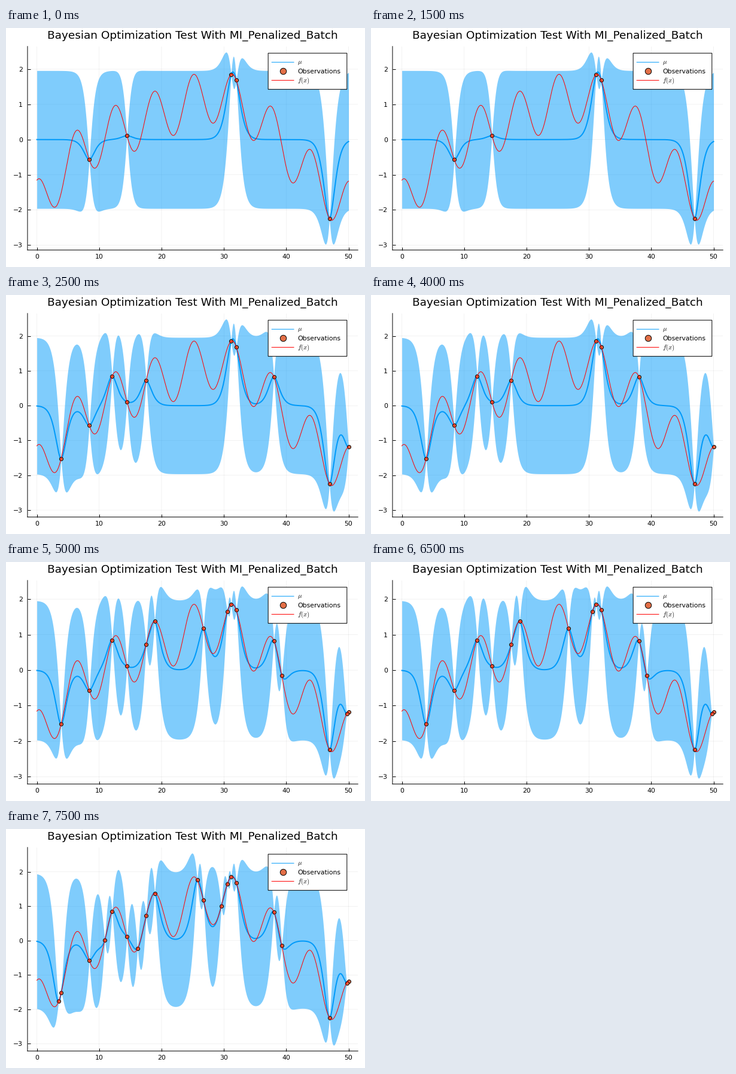
Recreate the animation shown at these times as a matplotlib script. Size 600 by 400 pixels, loop 10 s.

```python
import numpy as np
import matplotlib.pyplot as plt
from matplotlib.animation import FuncAnimation
from matplotlib.patches import Rectangle

W, H, DPI = 600, 400, 100
LEFT, RIGHT, TOP, BOTTOM = 35.97, 588.19, 30.79, 371.61
BLUE, ORANGE, RED = "#009AFA", "#E36F47", "#FF0000"
PX = 72 / DPI  # points per pixel
TITLE_SIZE, LABEL_SIZE = 18.45, 10.9

plt.rcParams.update({
    "font.family": "DejaVu Sans",
    "mathtext.fontset": "cm",
    "path.snap": False,  # keep lines and markers at subpixel positions
})

# Sample positions added by each batch
BATCHES = [
    [8.4, 14.45, 31.16, 31.98, 46.93],
    [3.89, 12.07, 17.53, 38.01, 50.0],
    [18.9, 26.72, 30.55, 39.28, 49.72],
    [3.5, 10.9, 16.15, 25.72, 29.58],
]
GRID = np.linspace(0, 50, 1001)


def objective(x):
    return (3 * np.sin(np.pi * x / 50) + 0.25 * np.sin(2 * np.pi * x / 25)
            + 0.75 * np.cos(x) - 1.905)


def matern52(a, b):
    r = np.sqrt(5) * np.abs(a[:, None] - b[None, :])
    return (1 + r + r**2 / 3) * np.exp(-r)


def posterior(x_obs):
    gram = matern52(x_obs, x_obs) + 1e-6 * np.eye(len(x_obs))
    cross = matern52(GRID, x_obs)
    weights = np.linalg.solve(gram, cross.T)
    mean = weights.T @ objective(x_obs)
    var = 1 - np.sum(cross.T * weights, axis=0)
    return mean, np.sqrt(np.clip(var, 0, None))


fig = plt.figure(figsize=(W / DPI, H / DPI), dpi=DPI, facecolor="white")
ax = fig.add_axes([LEFT / W, 1 - BOTTOM / H, (RIGHT - LEFT) / W, (BOTTOM - TOP) / H])
overlay = fig.add_axes([0, 0, 1, 1], zorder=5)
overlay.set(xlim=(0, W), ylim=(H, 0))
overlay.axis("off")


def label(x, y, text, size=LABEL_SIZE, **kw):
    overlay.text(x, y, text, fontsize=size * PX, **kw)


def draw_overlay():
    label((LEFT + RIGHT) / 2, 18.1, "Bayesian Optimization Test With MI_Penalized_Batch",
          TITLE_SIZE, ha="center")
    box_left, box_top, row = 438.15, 42.15, 15.12
    overlay.add_patch(Rectangle((box_left, box_top), 131.65, 4 * row,
                                fc="white", ec="black", lw=PX))
    for k, color in ((1, BLUE), (3, RED)):
        y = box_top + k * row
        overlay.plot([444.2, 481], [y, y], color=color, lw=PX)
    overlay.plot(462.6, box_top + 2 * row, "o", ms=10.4 * PX,
                 mfc=ORANGE, mec="black", mew=PX)
    label(487, 59.5, r"$\mu$")
    label(487, 76.5, "Observations")
    label(487, 91, "$f(x)$")
    for tick in range(0, 51, 10):
        x = LEFT + (tick + 1.5) * (RIGHT - LEFT) / 53
        label(x, 386.5, str(tick), ha="center")


def draw(i):
    x_obs = np.array(sum(BATCHES[:i + 1], []))
    mean, sd = posterior(x_obs)
    low, high = mean - 1.96 * sd, mean + 1.96 * sd
    pad = 0.03 * (high.max() - low.min())
    y0, y1 = low.min() - pad, high.max() + pad
    unit = (y1 - y0) / (BOTTOM - TOP)

    ax.clear()
    ax.set(xlim=(-1.5, 51.5), ylim=(y0, y1), xticks=range(0, 51, 10), yticks=range(-3, 3))
    ax.set_axisbelow(True)
    ax.grid(color="black", alpha=0.1, lw=0.5 * PX)
    ax.tick_params(direction="in", length=5 * PX, width=PX, labelbottom=False, labelleft=False)
    ax.spines[["top", "right"]].set_visible(False)
    ax.spines[["left", "bottom"]].set_linewidth(PX)
    for tick in range(-3, 3):
        ax.text(-2.27, tick - 4 * unit, str(tick).replace("-", "\u2212"),
                fontsize=LABEL_SIZE * PX, ha="right", va="baseline")

    ax.fill_between(GRID, low, high, color=BLUE, alpha=0.5, lw=0, zorder=2)
    ax.plot(GRID, mean, color=BLUE, lw=2 * PX, zorder=3)
    ax.plot(x_obs, objective(x_obs), "o", ms=6 * PX, mfc=ORANGE, mec="black",
            mew=PX, zorder=4)
    ax.plot(GRID, objective(GRID), color=RED, lw=PX, zorder=5)
    return []


draw_overlay()
anim = FuncAnimation(fig, draw, frames=len(BATCHES), interval=2500,
                     init_func=lambda: draw(0), repeat=True, repeat_delay=0)
plt.show()
```
